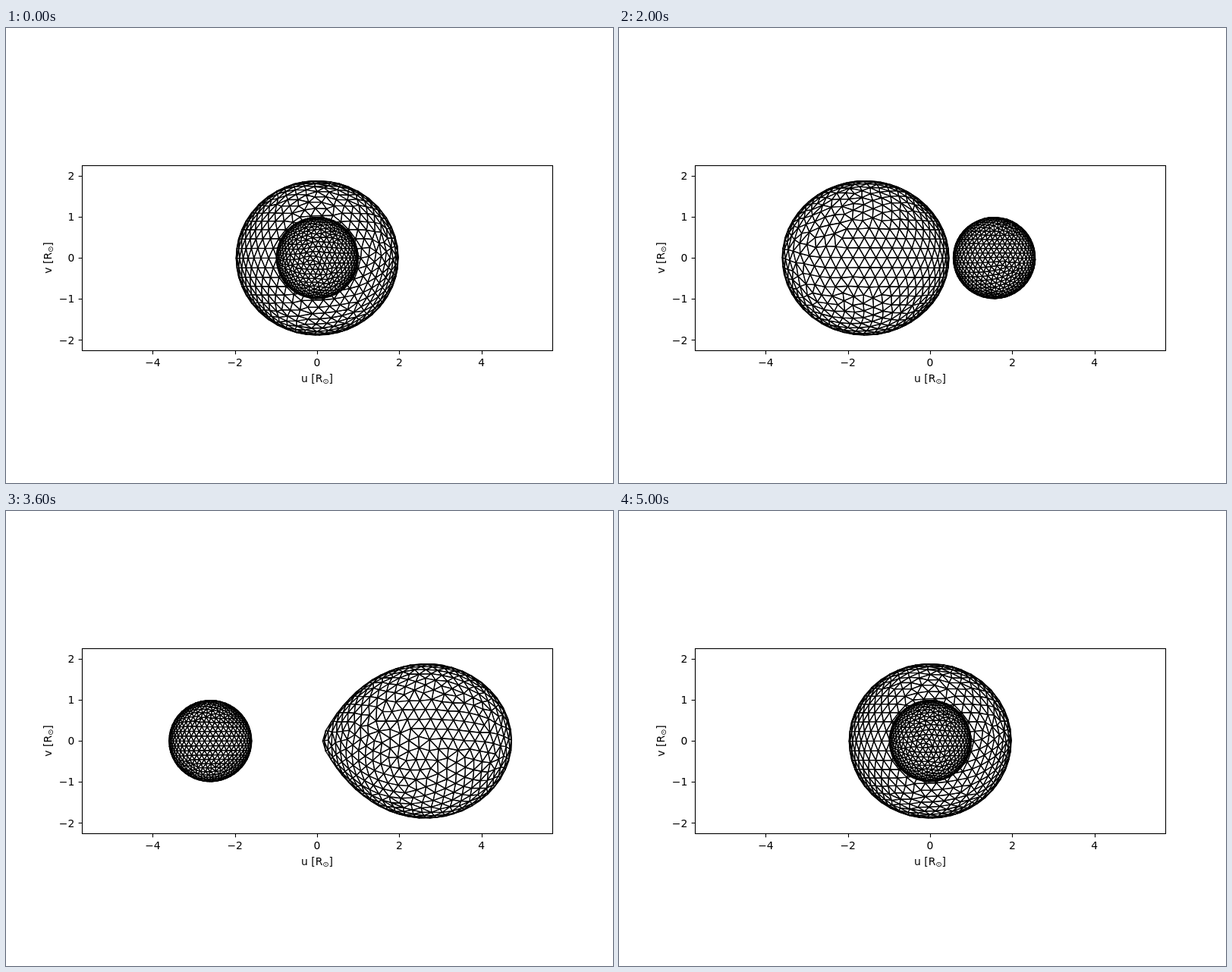
Recreate the animation shown at these times as an HTML page with a canvas. Size 800 px wide and 600 px high, loop 5100 ms.

```html
<!DOCTYPE html>
<html lang="en">
<head>
<meta charset="utf-8">
<title>Binary star meshes</title>
<style>
  html, body { margin: 0; width: 100%; height: 100%; overflow: hidden; background: #fff; }
  canvas, svg { position: absolute; left: 0; top: 0; width: 800px; height: 600px; }
  text { font: 13.89px "DejaVu Sans", sans-serif; fill: #000; }
  .sub { font-size: 9.72px; }
  path, rect { fill: none; stroke: #000; stroke-width: 1.11px; }
</style>
</head>
<body>
<canvas id="stage" width="800" height="600"></canvas>
<svg id="axes" viewBox="0 0 800 600"></svg>
<script>
const start = performance.now();
const UNIT = 54.15;          // pixels per solar radius
const SMA = 5.3;             // separation of the two stars
const CX = 410.2, CY = 303.2;
const FRAMES = 51, STEP = 100;

// Vectors
const add = (a, b, s = 1) => [a[0] + s * b[0], a[1] + s * b[1], a[2] + s * b[2]];
const mul = (a, s) => [a[0] * s, a[1] * s, a[2] * s];
const dot = (a, b) => a[0] * b[0] + a[1] * b[1] + a[2] * b[2];
const cross = (a, b) => [
  a[1] * b[2] - a[2] * b[1], a[2] * b[0] - a[0] * b[2], a[0] * b[1] - a[1] * b[0]];
const unit = a => mul(a, 1 / Math.hypot(a[0], a[1], a[2]));
const dist = (a, b) => Math.hypot(a[0] - b[0], a[1] - b[1], a[2] - b[2]);

// Roche potential for equal masses, with lengths in units of the separation
const potential = ([x, y, z]) =>
  1 / Math.hypot(x, y, z) + 1 / Math.hypot(x - 1, y, z) - x + x * x + y * y;

function normal(p) {
  const [x, y, z] = p;
  const a = Math.hypot(x, y, z) ** 3, b = Math.hypot(x - 1, y, z) ** 3;
  return unit([x / a + (x - 1) / b + 1 - 2 * x, y / a + y / b - 2 * y, z / a + z / b]);
}

// Grow a hexagonal mesh over the equipotential whose nose lies at `tip`
function buildStar(tip, delta) {
  const level = potential([tip, 0, 0]);
  const project = v => {
    const dir = unit(v);
    let lo = tip * 0.3, hi = tip;
    for (let i = 0; i < 36; i++) {
      const mid = (lo + hi) / 2;
      if (potential(mul(dir, mid)) > level) lo = mid; else hi = mid;
    }
    return mul(dir, hi);
  };

  let pts = [[tip, 0, 0]];
  const axes = [[0, -1, 0]];
  for (let i = 0; i < pts.length && pts.length < 3000; i++) {
    const p = pts[i], n = normal(p);
    const t1 = unit(add(axes[i], n, -dot(axes[i], n))), t2 = cross(n, t1);
    for (let k = 0; k < 6; k++) {
      const a = k * Math.PI / 3 + 0.01 * Math.sin(91 * i + 37 * k);
      const q = project(add(add(p, t1, delta * Math.cos(a)), t2, delta * Math.sin(a)));
      if (pts.every(o => dist(o, q) > 0.7 * delta)) {
        pts.push(q);
        axes.push(t1);
      }
    }
  }

  // Even out the seams where growing patches met
  const reach = 1.2 * delta;
  for (let pass = 0; pass < 10; pass++) {
    const moves = pts.map(() => [0, 0, 0]);
    for (let i = 0; i < pts.length; i++) {
      for (let j = 0; j < i; j++) {
        const d = dist(pts[i], pts[j]);
        if (d >= reach) continue;
        const push = mul(add(pts[i], pts[j], -1), 0.15 * (reach - d) / d);
        moves[i] = add(moves[i], push);
        moves[j] = add(moves[j], push, -1);
      }
    }
    pts = pts.map((p, i) => project(add(p, moves[i])));
  }
  return { pts, tris: triangulate(pts, 2.5 * delta) };
}

// Delaunay triangles: local facets of the hull of the point directions
function triangulate(pts, range) {
  const dirs = pts.map(unit), tris = [];
  for (let i = 0; i < pts.length; i++) {
    const near = [];
    for (let j = 0; j < pts.length; j++) {
      if (j !== i && dist(pts[i], pts[j]) < range) near.push(j);
    }
    for (const j of near) {
      if (j < i) continue;
      for (const k of near) {
        if (k <= j) continue;
        let n = cross(add(dirs[j], dirs[i], -1), add(dirs[k], dirs[i], -1));
        const flip = dot(n, dirs[i]) < 0;
        if (flip) n = mul(n, -1);
        const h = dot(n, dirs[i]);
        const empty = near.every(m => m === j || m === k || dot(n, dirs[m]) <= h);
        if (empty) tris.push(flip ? [i, k, j] : [i, j, k]);
      }
    }
  }
  return tris;
}

const primary = buildStar(0.4745, 0.0531);
const secondary = buildStar(0.1902, 0.0263);
primary.side = 1;
secondary.side = -1;

const ctx = document.getElementById('stage').getContext('2d');

function drawStar({ pts, tris, side }, phi) {
  const s = Math.sin(phi), c = Math.cos(phi), size = UNIT * SMA;
  const view = pts.map(([x, y, z]) => {
    const X = side * (x - 0.5), Y = side * y;
    return [CX + size * (X * s + Y * c), CY - size * z, X * c - Y * s];
  });
  const faces = tris.map(t => t.map(i => view[i]))
    .filter(([a, b, d]) =>
      (b[0] - a[0]) * (d[1] - a[1]) - (b[1] - a[1]) * (d[0] - a[0]) < 0)
    .map(f => ({ f, w: f[0][2] + f[1][2] + f[2][2] }))
    .sort((a, b) => a.w - b.w);
  for (const { f } of faces) {
    ctx.beginPath();
    for (const [x, y] of f) ctx.lineTo(x, y);
    ctx.closePath();
    ctx.fill();
    ctx.stroke();
  }
}

function drawAxes() {
  const snap = v => Math.floor(v + 0.5) + 0.5;
  const label = v => String(v).replace('-', '\u2212');
  const title = (name, place) =>
    `<text text-anchor="middle" ${place}>${name} [R<tspan class="sub" dy="2.2">\u2299</tspan>` +
    `<tspan dy="-2.2">]</tspan></text>`;
  let svg = '<rect x="100.5" y="181.5" width="620" height="244"/>';
  for (const u of [-4, -2, 0, 2, 4]) {
    const x = 410 + u * UNIT;
    svg += `<path d="M${snap(x)} 425.5v4.9"/>` +
      `<text x="${x}" y="446" text-anchor="middle">${label(u)}</text>`;
  }
  for (const v of [-2, -1, 0, 1, 2]) {
    const y = 303 - v * UNIT;
    svg += `<path d="M100.5 ${snap(y)}h-4.9"/>` +
      `<text x="90.3" y="${y + 5.3}" text-anchor="end">${label(v)}</text>`;
  }
  svg += title('u', 'x="410" y="467"') + title('v', 'transform="translate(60 303) rotate(-90)"');
  document.getElementById('axes').innerHTML = svg;
}

let shown = -1;
function tick() {
  const k = Math.floor((performance.now() - start) / STEP) % FRAMES;
  if (k !== shown) {
    shown = k;
    const phi = 2 * Math.PI * k / (FRAMES - 1);
    ctx.clearRect(0, 0, 800, 600);
    const order = [primary, secondary];
    if (Math.cos(phi) < 0) order.reverse();
    for (const star of order) drawStar(star, phi);
  }
  requestAnimationFrame(tick);
}

ctx.fillStyle = '#fff';
ctx.strokeStyle = '#000';
ctx.lineWidth = 1.39;
ctx.lineJoin = 'round';
drawAxes();
tick();
</script>
</body>
</html>
```
